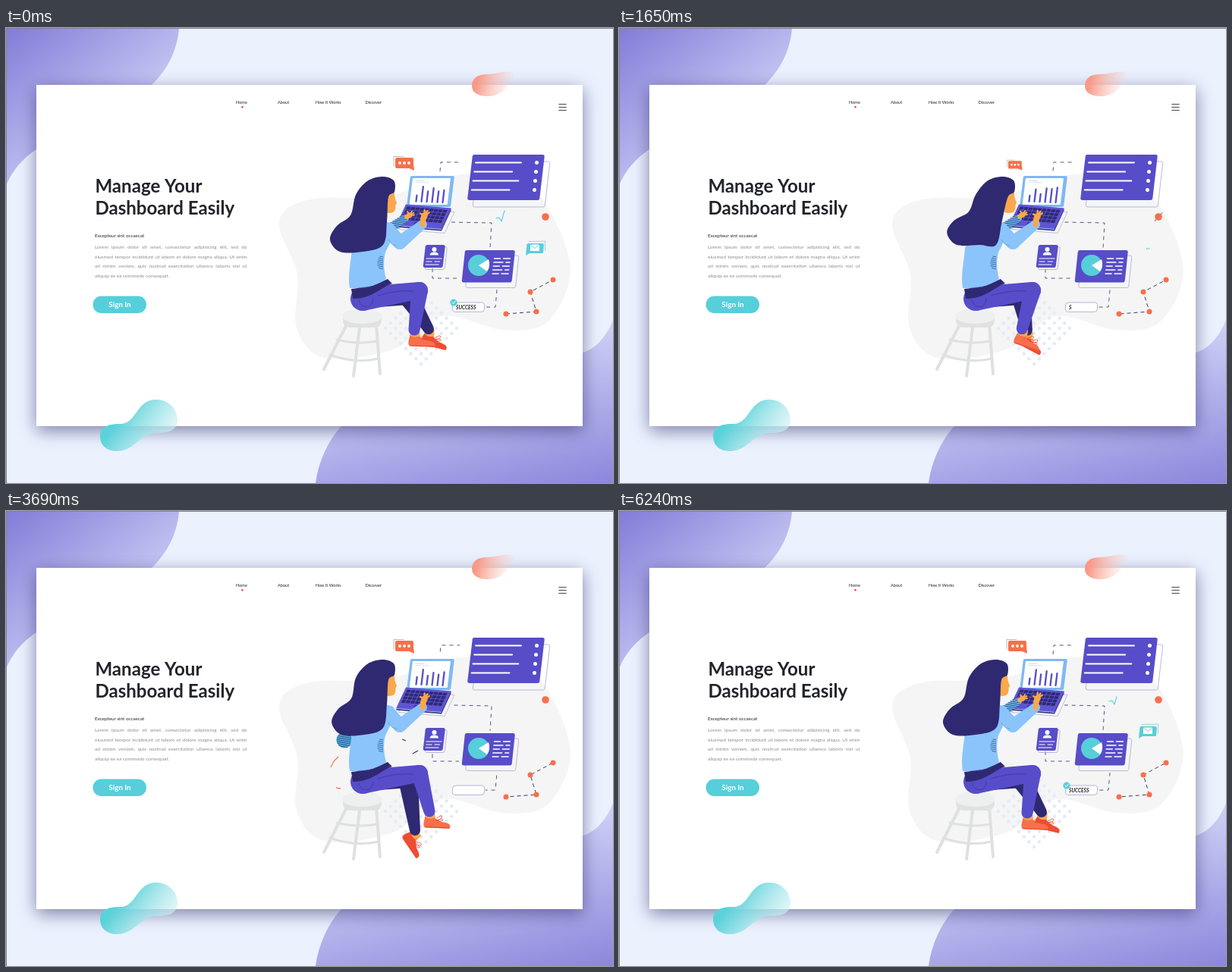
Write an HTML page with a canvas that moves like this. It is 800 px wide and 600 px high and loops after 6.27 s.

```html
<!DOCTYPE html>
<html lang="en">
<head>
<meta charset="utf-8">
<title>Manage Your Dashboard Easily</title>
<style>
html, body { margin: 0; width: 100%; height: 100%; overflow: hidden; background: #ebf2fe; }
canvas { display: block; width: 800px; height: 600px; }
</style>
</head>
<body>
<canvas id="stage" width="800" height="600"></canvas>
<script>
const LOOP = 6270;
const PURPLE = '#574dc8', NAVY = '#2f2972', BLUE = '#8ac4fb', SKIN = '#f9a84b';
const CORAL = '#f86f4b', RED = '#ee4d33', TEAL = '#56cfda', RULE = '#b2b2da';
const live = document.getElementById('stage').getContext('2d');
const still = Object.assign(document.createElement('canvas'), { width: 800, height: 600 });
let c = still.getContext('2d');

// ---------- motion ----------
const mix = (a, b, u) => a + (b - a) * u;
const clamp = v => Math.max(0, Math.min(1, v));
const ease = v => (v = clamp(v), v * v * (3 - 2 * v));
// rises to 1 at `on`, falls back to 0 at `off`
const bump = (t, on, off, ramp = 450) => ease((t - on) / ramp) * (1 - ease((t - off) / ramp));

// ---------- drawing ----------
const path = d => new Path2D(d);
const poly = (pts, end = 'Z') => path('M' + pts.join('L') + end);

function fill(color, p) {
  c.fillStyle = color;
  c.fill(p);
}

// closed Catmull-Rom curve
function smooth(pts) {
  const n = pts.length, p = new Path2D(), at = i => pts[(i + n) % n];
  p.moveTo(...pts[0]);
  for (let i = 0; i < n; i++) {
    const [a, b, d, e] = [at(i - 1), at(i), at(i + 1), at(i + 2)];
    p.bezierCurveTo(b[0] + (d[0] - a[0]) / 6, b[1] + (d[1] - a[1]) / 6,
      d[0] - (e[0] - b[0]) / 6, d[1] - (e[1] - b[1]) / 6, ...d);
  }
  return p;
}

// rounded parallelogram, its foot shifted by `lean`
function slab(x, y, w, h, lean, r) {
  const p = new Path2D(), pts = [[x, y], [x + w, y], [x + w + lean, y + h], [x + lean, y + h]];
  p.moveTo(x + w / 2, y);
  for (let i = 1; i < 5; i++) p.arcTo(...pts[i % 4], ...pts[(i + 1) % 4], r);
  p.closePath();
  return p;
}

function line(shape, color, w = 1, dash = [], shift = 0) {
  c.strokeStyle = color;
  c.lineWidth = w;
  c.lineCap = dash.length ? 'butt' : 'round';
  c.lineJoin = 'round';
  c.setLineDash(dash);
  c.lineDashOffset = shift;
  c.stroke(shape instanceof Path2D ? shape : poly(shape, ''));
}

function dot(x, y, r, color) {
  const p = new Path2D();
  p.arc(x, y, r, 0, 7);
  fill(color, p);
}

// tapered limb between two round ends
function limb(a, b, ra, rb, color) {
  const k = Math.atan2(b[1] - a[1], b[0] - a[0]) + Math.PI / 2;
  const side = (p, r) => [p[0] + Math.cos(k) * r, p[1] + Math.sin(k) * r];
  fill(color, poly([side(a, ra), side(b, rb), side(b, -rb), side(a, -ra)]));
  dot(...a, ra, color);
  dot(...b, rb, color);
}

function text(s, x, y, font, color, align = 'left') {
  c.font = font + ' Lato, sans-serif';
  c.fillStyle = color;
  c.textAlign = align;
  c.fillText(s, x, y);
}

function gradient(x0, y0, x1, y1, a, b) {
  const g = c.createLinearGradient(x0, y0, x1, y1);
  g.addColorStop(0, a);
  g.addColorStop(1, b);
  return g;
}

// runs draw() moved to x, y, turned and scaled
function placed(x, y, deg, s, draw) {
  c.save();
  c.translate(x, y);
  c.rotate(deg * Math.PI / 180);
  c.scale(s, s);
  draw();
  c.restore();
}

function hatch(p, color) {
  c.save();
  c.clip(p);
  for (let y = 230; y < 330; y += 2.6) line([[430, y], [530, y + 18]], color, 0.8);
  c.restore();
}

// part of a polyline from a to b, both 0..1
function trim(pts, a, b, color) {
  if (b - a < 0.02) return;
  let len = 0;
  pts.forEach((p, i) => { if (i) len += Math.hypot(p[0] - pts[i - 1][0], p[1] - pts[i - 1][1]); });
  line(pts, color, 1.1, [len * (b - a), len * 2], -len * a);
}

// ---------- page ----------
function backdrop() {
  c.fillStyle = '#ebf2fe';
  c.fillRect(0, 0, 800, 600);
  fill(gradient(10, 0, 150, 170, '#857ed9', '#d2d4f8'),
    path('M0 0H228C226 30 212 55 195 72C160 110 80 130 40 160C22 172 8 188 0 208Z'));
  fill(gradient(740, 620, 690, 400, '#8a84db', '#d3d5f8'),
    path('M408 600C412 570 425 545 440 527C540 440 650 480 760 428C775 424 790 410 800 385V600Z'));
  c.fillStyle = '#7f8298';
  c.fillRect(0, 0, 800, 1);
  c.fillRect(0, 0, 1, 600);

  c.save();
  c.shadowColor = 'rgba(50,50,110,.6)';
  c.shadowBlur = 22;
  c.shadowOffsetY = 6;
  c.fillStyle = '#fff';
  c.fillRect(40, 75, 720, 450);
  c.restore();

  fill(gradient(620, 74, 664, 84, '#f89a87', 'rgba(250,205,195,.15)'),
    path('M614 76C614 66 622 61 634 61C648 61 656 56 666 58C674 60 668 66 664 72C658 82 650 90 635 90C624 90 614 86 614 76Z'));
  fill(gradient(160, 500, 218, 542, '#5bd2da', 'rgba(215,243,245,.6)'),
    path('M124 538C124 524 138 522 152 522C172 521 172 490 198 490C214 490 226 502 226 517C226 532 212 534 198 534C176 535 170 558 146 558C132 558 124 550 124 538Z'));
}

function copy() {
  text('Home', 303, 100, '5.6px', '#222');
  text('About', 358, 100, '5.6px', '#222');
  text('How It Works', 407.7, 100, '5.6px', '#222');
  text('Discover', 473.5, 100, '5.6px', '#222');
  dot(311.5, 104.3, 1.2, '#ee3b4a');
  for (let i = 0; i < 3; i++) line([[728.8, 100.5 + i * 4], [738.2, 100.5 + i * 4]], '#4a4a4a', 1.2);

  text('Manage Your', 117.4, 217, 'bold 24.1px', '#22242b');
  text('Dashboard Easily', 117.4, 246, 'bold 24.1px', '#22242b');
  text('Excepteur sint occaecat', 117, 275.5, '6.3px', '#222');
  const lines = ['Lorem ipsum dolor sit amet, consectetur adipisicing elit, sed do',
    'eiusmod tempor incididunt ut labore et dolore magna aliqua. Ut enim',
    'ad minim veniam, quis nostrud exercitation ullamco laboris nisi ut',
    'aliquip ex ea commodo consequat.'];
  c.font = '6.5px Lato, sans-serif';
  lines.forEach((s, i) => {
    c.wordSpacing = '0px';
    const gap = (200.5 - c.measureText(s).width) / (s.split(' ').length - 1);
    if (i < 3) c.wordSpacing = gap + 'px';
    text(s, 117, 291.3 + i * 12.4, '6.5px', '#8d8d8d');
  });
  c.wordSpacing = '0px';

  fill(TEAL, slab(114.5, 353.5, 70.5, 22.5, 0, 11.2));
  text('Sign In', 150, 368.3, 'bold 9.8px', '#fff', 'center');
}

function ground() {
  fill('#f5f5f5', smooth([[360, 256], [400, 226], [500, 222], [600, 193], [690, 207], [743, 310],
    [715, 386], [655, 398], [575, 380], [510, 424], [420, 435], [383, 395], [384, 325]]));
  for (let i = 0; i < 64; i++) {
    const a = i % 8, b = i >> 3;
    dot(547 + (a - b) * 6.7, 396 + (a + b - 7) * 6.7, 2.3, '#e4eaf8');
  }
}

function stool() {
  const wood = '#dfe1e1';
  line(path('M436 411Q464 418 489 413M427 431Q460 443 491 436'), wood, 3);
  line(path('M449 391L419 450M488 391L493 456M466 395L458 459'), wood, 4);
  limb([453, 386], [486, 386], 9, 9, '#e0e2e2');
  const seat = new Path2D();
  seat.ellipse(469.5, 380, 26.5, 10, 0, 0, 7);
  fill('#eef0f0', seat);
}

// ---------- floating panels ----------
function panel(x, y, w, h, lean, dx, dy) {
  line(slab(x + dx, y + dy, w, h, lean, 2.5), RULE, 0.9);
  fill(PURPLE, slab(x, y, w, h, lean, 2.5));
}

function links(t) {
  const shift = -t / LOOP * 40;
  line(path('M572 189L573 177H598M587 256L640 257L638 290M562 317V330H597M647 345L645 368H632'), '#55558f', 1, [5, 5], shift);
  const nodes = [[659, 377], [699, 374], [691, 348], [721, 332]];
  line(nodes, '#3a3a60', 1, [5, 4], shift);
  nodes.forEach(p => dot(...p, 3.5, CORAL));
}

function cards() {
  panel(615, 167, 95, 60, -7, 7, 9);
  for (let i = 0; i < 4; i++) {
    const x = 619 - i * 1.8, y = 177.5 + i * 12;
    line([[x, y], [x + (i % 2 ? 50 : 60), y]], '#fff', 1.8);
    dot(699.5 - i, y, 2.5, '#fff');
  }

  panel(605, 293, 66, 42.5, -4.5, 5, 7);
  dot(623, 313, 14, TEAL);
  fill('#fff', path('M623 313L636 305Q639 313 634 321Z'));
  for (let i = 0; i < 5; i++) {
    const x = 643.5 - i * 0.6, y = 304 + i * 5, cut = x + 8 + i % 2 * 4;
    line([[x, y], [cut, y]], '#fff', 1.4);
    line([[cut + 4, y], [x + 21, y]], '#fff', 1.4);
  }

  panel(553, 286, 26, 30, -3.5, 2.5, 2.5);
  dot(564.5, 292, 3, '#fff');
  fill('#fff', path('M558.5 299.5Q559 295.5 564.5 295.5Q570 295.5 570 299.5Z'));
  for (let i = 0; i < 3; i++) line([[554 - i / 2, 304 + i * 4], [574 - i * 2, 304 + i * 4]], '#fff', 1.2, i === 1 ? [8, 3] : []);
}

function badges(t) {
  placed(513, 187, 0, 1 - bump(t, 1500, 2700), () => {
    line(path('M-2 -5V-17.5H11'), '#b5a4a4', 0.8);
    fill(CORAL, slab(0, -16, 24, 14, 0, 2));
    fill(CORAL, path('M16 -3L24 -8L25 1Z'));
    for (let i = 0; i < 3; i++) dot(6 + i * 6, -9, 1.9, '#fff');
  });

  placed(697, 291, 0, 1 - bump(t, 1350, 4700, 400), () => {
    line(path('M-8 -9.5L13.5 -10V2'), '#8fc9cf', 0.8);
    fill(TEAL, slab(-10.5, -7, 22.5, 13, -1, 2));
    fill(TEAL, path('M-11 0L-12 9L-4 4Z'));
    fill('#fff', slab(-6, -5.5, 12, 8.5, 0, 0.5));
    line(path('M-5.5 -5L0 -0.5L5.5 -5'), TEAL, 0.9);
  });

  const box = slab(589, 362, 42, 12.3, -1, 3.5);
  fill('#fff', box);
  line(box, RULE, 1);
  text('SUCCESS'.slice(0, Math.round(7 - 7 * bump(t, 1300, 4000))), 593, 370.8, 'italic bold 6.6px', '#222');
  placed(590, 362, 0, 1 - bump(t, 1150, 4650, 300), () => {
    dot(0, 0, 4.6, TEAL);
    line(path('M-2 0L-0.5 1.6L2.3 -2'), '#fff', 1);
  });
}

function sparks(t) {
  for (const start of [1700, 4350, 6050]) {
    const age = (t - start + LOOP) % LOOP;
    trim([[645, 251], [650, 250], [653, 255], [657, 241], [659, 249], [664, 248]],
      ease((age - 150) / 900), ease(age / 350), TEAL);
  }

  const ray = bump(t, 700, 3200) + bump(t, 4000, 5400);
  if (ray > 0.02) line([[711 - 5 * ray, 249 + 5.5 * ray], [711 + 5 * ray, 249 - 5.5 * ray]], '#4a3a50', 0.9);
  dot(711, 249, 4.8, CORAL);

  const out = bump(t, 3200, 3750);
  trim([[438, 324], [432, 330], [428, 338]], 0, out, CORAL);
  trim([[435, 365], [441, 366]], 0, out, RED);
  trim([[522, 301], [527, 303]], 0, out, NAVY);
  trim([[543, 316], [536, 320]], 0, out, NAVY);
}

function laptop(t) {
  fill('#7fb9f3', slab(533, 195, 58, 41, -5, 2));
  fill('#fff', slab(536, 198, 50, 35, -4.3, 0.5));
  line([[540, 201], [551, 201.4]], '#d8c9b8', 0.8);
  line([[540, 203.5], [557, 204]], '#d5d5e2', 0.8);
  for (let i = 0; i < 6; i++) {
    const x = 540.5 + i * 7, y = 228.6 + i * 0.3;
    const h = (i % 2 ? 18 : 8 + i * 2) + 2 * Math.sin(i + t / LOOP * Math.PI * 4);
    line([[x, y], [x + h * 0.12, y - h]], PURPLE, 2.3);
  }

  // deck: u runs along a key row, v towards the user
  const at = (u, v) => [mix(mix(527, 514, v), mix(587, 574, v), u), mix(232.5, 260.5, v) + u * 5];
  const area = (u, v, w, h) => poly([at(u, v), at(u + w, v), at(u + w, v + h), at(u, v + h)]);
  placed(4, 5, 0, 1, () => line(area(0, 0, 1, 1), RULE, 0.8));
  placed(0, 2, 0, 1, () => fill(NAVY, area(0, 0, 1, 1)));
  fill('#5f55d2', area(0, 0, 1, 1));
  for (let i = 0; i < 36; i++) fill(NAVY, area(0.05 + i % 9 * 0.1, 0.1 + (i / 9 | 0) * 0.16, 0.085, 0.13));
  fill('#443aa5', area(0.36, 0.77, 0.28, 0.16));
  line([at(0.01, 1), at(0.99, 1)], '#9bcbf9', 1);
}

// ---------- figure ----------
function foot(x, y, deg, color) {
  placed(x, y, deg, 1.1, () => {
    fill(SKIN, poly([[-5, -5], [6, -5], [8, 7], [-5, 7]]));
    fill(color, path('M-5 2Q-1 6 6 3Q12 8 20 8.5Q27 10 25 15H-4Q-7 15 -6.5 9Z'));
    line([[-4, 14.6], [24, 14.6]], RED, 1.2);
    line(path('M8 5Q15 -3 15 2Q14 5 9 6Q18 2 16 6Q13 8 9 6'), RED, 0.7);
  });
}

function hand(x, y, deg, s) {
  placed(x, y, deg, s, () => {
    limb([-4, 2], [1, 0], 3.4, 4, SKIN);
    line(path('M1 0L6 -5M1 0L8 -2M1 0L8 1.5M1 0L-1 -6'), SKIN, 2.4);
  });
}

function legs(t) {
  const tuck = bump(t, 1450, 2600, 500), hang = bump(t, 2600, 4700, 500);
  // ankle x, y and turn: resting, tucked under, hanging
  const pose = (rest, under, down) => rest.map((v, i) => v + (under[i] - v) * tuck + (down[i] - v) * hang);
  const far = pose([557, 402, 14], [503, 407, 54], [539, 426, 56]);
  const near = pose([538, 403, 2], [519, 399, 48], [558, 401, 2]);
  const knee = [545, 346];

  foot(...far, RED);
  limb([490, 355], [530, 352], 13, 13, NAVY);
  limb([530, 354], [far[0], far[1] - 5], 13, 7, NAVY);
  foot(...near, CORAL);
  limb(knee, [near[0], near[1] - 5], 11, 7.5, PURPLE);
  limb([470, 357], knee, 16, 11, PURPLE);
  fill(NAVY, path('M455 344L478 342L503 331L509 337C496 340 484 357 457 357Z'));
  line(path('M465 359Q468 370 479 367Q484 363 484 357M490 353Q515 345 536 347'), '#3d34a6', 0.8);
}

function farArm(back, palm, tap) {
  const reach = clamp(1 - back * 2), rear = clamp(back * 2 - 1);
  if (rear > 0) {
    const elbow = new Path2D();
    elbow.arc(mix(470, 446, rear), 302, 10.5, 0, 7);
    fill('#4fb4de', elbow);
    hatch(elbow, NAVY);
  }
  if (reach > 0) {
    const x = mix(500, 526, reach), y = mix(265, 251, reach);
    if (palm < 0.8) {
      limb([506, 264], [x, y], 6, 5, '#66bdf0');
      hatch(poly([[504, 258], [x - 2, y - 6], [x + 4, y + 4], [510, 270]]), NAVY);
    }
    hand(x + 5, y - 4 - tap * 0.7, -12, 0.85);
  }
}

function head(t, lean) {
  placed(lean, 0, 0, 1, () => fill(SKIN,
    path('M500 220L512 217Q512 224 514 228Q516 231 513.5 233Q514 241 510 243Q505 245 499 243Z')));
  // hair: the crown follows the head, the tail swings and lifts
  const sway = 4 - 4 * Math.cos(t / LOOP * Math.PI * 4) - lean * 0.3;
  const hair = [[495, 196], [511, 201], [512, 216], [504, 223], [502, 255], [497, 286], [470, 295],
    [440, 295], [427, 279], [436, 261], [454, 247], [461, 220], [476, 202]];
  fill(NAVY, smooth(hair.map(([x, y]) => {
    const low = clamp((y - 220) / 50), tail = x < 485 ? low : 0;
    return [x + lean * (1 - low) + sway * tail, y - lean * tail];
  })));
}

function woman(t) {
  const lean = 9 * bump(t, 200, 2600, 700) + 10 * bump(t, 4450, 5450, 650);
  const palm = bump(t, 350, 1250, 400);
  const back = bump(t, 2900, 3850, 550);
  const low = bump(t, 1700, 2600) + bump(t, 4050, 4700);
  const tap = Math.sin(t / LOOP * Math.PI * 32) * (1 - palm);

  farArm(back, palm, tap);
  legs(t);
  fill(BLUE, path('M470 270C480 258 504 252 511 259C514 268 506 285 500 296C497 308 498 320 501 331C488 341 470 343 453 343C450 324 455 308 456 290Z'));
  hatch(path('M493 300H497V318H492Q486 310 493 300Z'), '#25548a');

  const elbow = [519, 283];
  const wrist = [mix(549 + low * 4, 517, palm), mix(259 + low * 4, 252, palm)];
  const grip = [mix(551 + low * 6, 513, palm), mix(248 + low * 8 + tap, 236, palm)];
  limb([506, 268], elbow, 9, 9, BLUE);
  limb(elbow, wrist, 9, 6, BLUE);
  line(path('M504 279Q508 287 515 287'), '#5d9de0', 0.8);
  head(t, lean);
  limb(wrist, grip, 3.5, 3.5, SKIN);
  hand(...grip, mix(-45, -85, palm), 1 + palm * 0.3);
}

// ---------- run ----------
backdrop();
copy();
ground();
stool();
c = live;

function frame(now) {
  const t = now % LOOP;
  c.drawImage(still, 0, 0);
  links(t);
  cards();
  badges(t);
  laptop(t);
  sparks(t);
  woman(t);
  requestAnimationFrame(frame);
}
requestAnimationFrame(frame);
</script>
</body>
</html>
```
